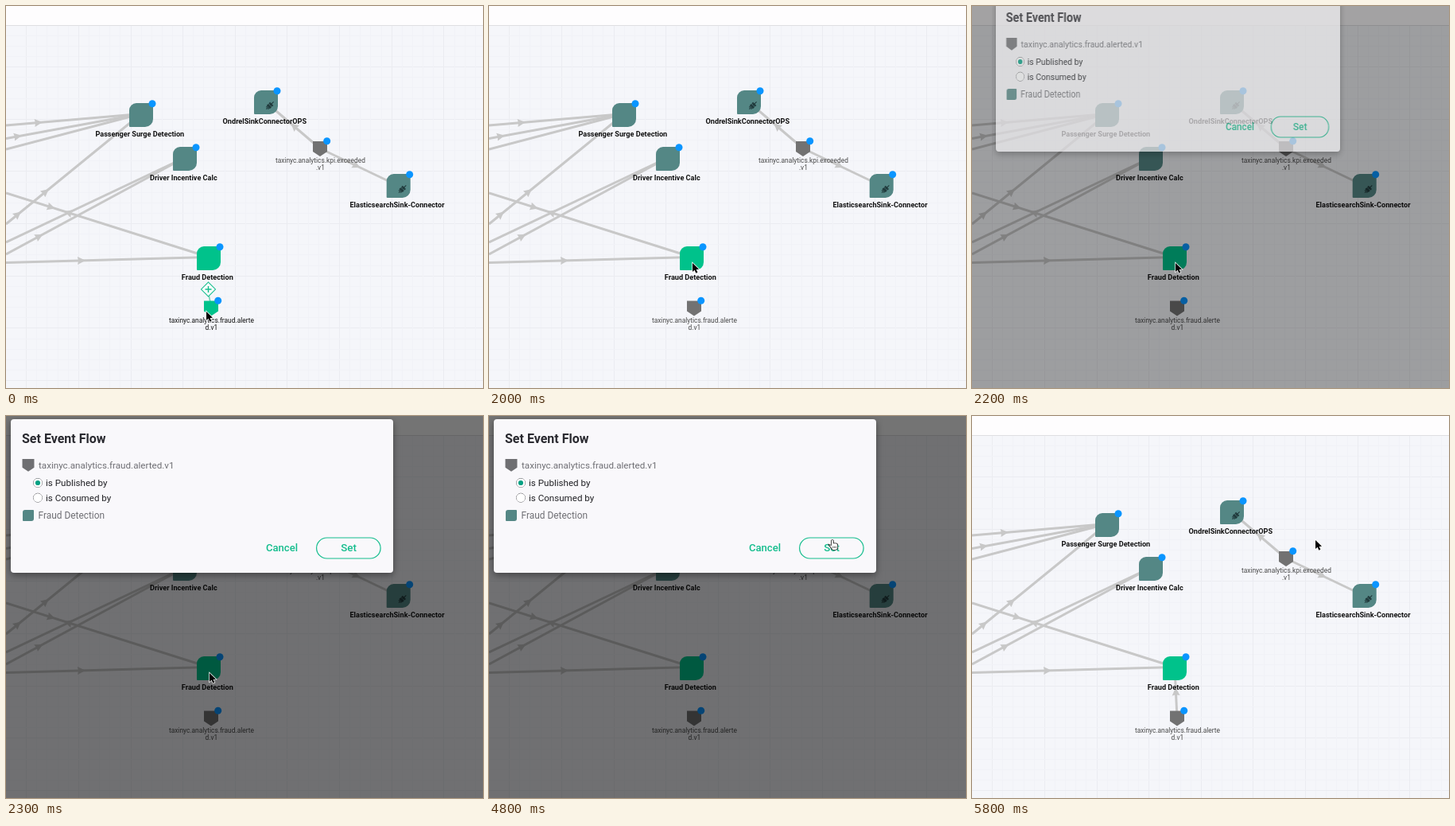
An HTML page with a canvas for the animation above (5.9 s loop, 600x480 px).

```html
<!DOCTYPE html>
<html lang="en">
<head>
<meta charset="utf-8">
<title>Event flow editor</title>
<style>
  html, body { margin: 0; width: 100%; height: 100%; overflow: hidden; background: #f5f6fa; }
  canvas { display: block; width: 600px; height: 480px; }
</style>
</head>
<body>
<canvas id="stage" width="600" height="480"></canvas>
<script>
const W = 600, H = 480, LOOP = 5900, STEP = 100;
const FONT = 'Roboto, Inter, sans-serif';
const GREEN = '#00c28b', MINT = '#14bd8d', TEAL = '#548785', BLUE = '#0a95ff';
const EDGE = '#c8c8c8', GREY = '#727272', INK = '#111';
const DRAG = 900, DROP = 2000, OPEN = 2020, CLOSE = 4897, FADE = 270, LINKED = 5300;

const stage = document.getElementById('stage').getContext('2d');
let ctx = stage;

const passenger = { x: 170, y: 137, label: 'Passenger Surge Detection' };
const driver = { x: 225, y: 192, label: 'Driver Incentive Calc' };
const sink = { x: 327, y: 121, label: 'OndrelSinkConnectorOPS', plug: true };
const search = { x: 493.7, y: 226, label: 'ElasticsearchSink-Connector', plug: true };
const fraud = { x: 255, y: 317, label: 'Fraud Detection', active: true };
const nodes = [passenger, driver, sink, search, fraud];
const kpi = { x: 395, y: 179, lines: ['taxinyc.analytics.kpi.exceeded', '.v1'] };
const alerted = { x: 258, y: 379.5, lines: ['taxinyc.analytics.fraud.alerte', 'd.v1'] };

// cursor moves: begin, end, x, y
const home = { x: 252, y: 384 };
const moves = [
  [300, 900, 254, 355], [900, 1200, 255, 327], [1800, 2000, 256, 323],
  [2600, 3700, 78, 94], [3800, 4700, 432, 156]
];

const clamp = v => Math.max(0, Math.min(1, v));
const mix = (a, b, p) => a + (b - a) * p;
const ease = p => (1 - Math.cos(Math.PI * p)) / 2;

function cursorAt(t) {
  let { x, y } = home;
  for (const [from, to, nx, ny] of moves) {
    const p = ease(clamp((t - from) / (to - from)));
    x = mix(x, nx, p);
    y = mix(y, ny, p);
  }
  return { x, y };
}

function text(str, x, y, size, color, weight = 400, align = 'left') {
  ctx.font = `${weight} ${size}px ${FONT}`;
  ctx.textAlign = align;
  ctx.fillStyle = color;
  ctx.fillText(str, x, y + size * 0.36);
}

function line(x1, y1, x2, y2, color, width) {
  ctx.strokeStyle = color;
  ctx.lineWidth = width;
  ctx.beginPath();
  ctx.moveTo(x1, y1);
  ctx.lineTo(x2, y2);
  ctx.stroke();
}

function poly(pts) {
  ctx.beginPath();
  for (const [x, y] of pts) ctx.lineTo(x, y);
  ctx.closePath();
}

function paint(fill, stroke, width) {
  if (stroke) {
    ctx.strokeStyle = stroke;
    ctx.lineWidth = width;
    ctx.stroke();
  }
  if (fill) {
    ctx.fillStyle = fill;
    ctx.fill();
  }
}

function round(x, y, w, h, r) {
  ctx.beginPath();
  ctx.roundRect(x, y, w, h, r);
}

function disc(x, y, r, fill, stroke) {
  ctx.beginPath();
  ctx.arc(x, y, r, 0, Math.PI * 2);
  paint(fill, stroke, 1);
}

function at(x, y, shape, angle = 0) {
  ctx.save();
  ctx.translate(x, y);
  ctx.rotate(angle);
  shape();
  ctx.restore();
}

function board() {
  ctx.fillStyle = '#f5f6fa';
  ctx.fillRect(0, 0, W, H);
  for (let i = 0; i < 46; i++) {
    const color = i % 5 ? '#f1f2f7' : '#ebecf1';
    const x = Math.round(25.2 + i * 13.13) + 0.5;
    const y = Math.round(10.5 + i * 13.13) + 0.5;
    line(x, 25, x, H, color, 1);
    line(0, y, W, y, color, 1);
  }
  ctx.fillStyle = '#fefdfe';
  ctx.fillRect(0, 0, W, 24);
  line(0, 24.5, W, 24.5, '#dfdfe2', 1);
}

// arrows: x positions along the edge; a negative one points backwards
function edge(from, to, ...arrows) {
  const dx = to.x - from.x, dy = to.y - from.y;
  line(from.x, from.y, to.x, to.y, EDGE, 3);
  for (const a of arrows) {
    const x = Math.abs(a), y = from.y + dy * (x - from.x) / dx;
    at(x, y, () => {
      poly([[5, 0], [-5, -5], [-4, 0], [-5, 5]]);
      paint(EDGE);
    }, Math.atan2(dy, dx) + (a < 0 ? Math.PI : 0));
  }
}

function edges() {
  const inlet = (y, node, ...arrows) => edge({ x: 0, y }, { x: node.x, y: node.y - 1.5 }, ...arrows);
  inlet(150, passenger, 41);
  inlet(166.5, passenger, 15);
  inlet(180, passenger);
  inlet(274, passenger, 15, 50);
  inlet(297, driver);
  inlet(312, driver, 42);
  inlet(322.5, fraud, 95);
  inlet(235, fraud, 57, -78);
  edge(kpi, sink, 362);
  edge(kpi, search, 441);
}

function plug() {
  const dark = '#213b3d';
  for (const x of [-1.6, 2]) line(x, -3, x, 3, dark, 2.3);
  for (const y of [-1.6, 1.6]) line(-5, y, 0.6, y, dark, 1.2);
  line(-6.5, 0, 6.5, 0, dark, 1.2);
}

function node({ x, y, label, plug: hasPlug, active }, target) {
  const pale = active ? '#cceae3' : '#c6dfe0';
  if (target && active) {
    round(x - 18, y - 20, 38, 39, [12, 2]);
    paint('#c9ebe2');
  }
  if (target) {
    round(x - 14.5, y - 15, 29.5, 30, [10, 2]);
    paint(pale, active ? '#0bbd8b' : '#07868a', 4);
    round(x - 12.5, y - 13, 25.5, 26, [8, 1]);
    paint(null, active ? '#0bbd8b' : '#07868a', 4);
  } else {
    round(x - 15, y - 15, 30, 30, [9, 4, 10, 1]);
    paint(active ? GREEN : TEAL);
    if (hasPlug) at(x + 5, y + 4, plug, -Math.PI / 4);
  }
  disc(x + 14, y - 14.2, 4.5, target ? (active ? pale : '#c6dce6') : BLUE);
  text(label, x - 1.7, y + 23.3, 9.15, INK, 700, 'center');
}

function shield(x, y, color, s = 1) {
  poly([[-9, -9], [9, -9], [9, 4], [0, 10], [-9, 4]].map(([u, v]) => [x + u * s, y + v * s]));
  paint(color);
}

function event({ x, y, lines }, selected) {
  shield(x, y, selected ? GREEN : GREY);
  disc(x + 8.7, y - 9.3, 4.5, BLUE);
  lines.forEach((s, i) =>
    text(s, x + 0.4, y + 15 + i * 9, 8.4, selected ? INK : '#4a4a4a', 400, 'center'));
}

function diamond(x, y, r) {
  poly([[x, y - r], [x + r, y], [x, y + r], [x - r, y]]);
  paint('#fbfdfd', MINT, 2);
  line(x - 4, y, x + 4, y, MINT, 1.5);
  line(x, y - 4, x, y + 4, MINT, 1.5);
}

function dialog() {
  ctx.save();
  ctx.shadowColor = 'rgba(0,0,0,.4)';
  ctx.shadowBlur = 9;
  ctx.shadowOffsetY = 3;
  round(6, 4, 481, 193, 4);
  paint('#f9f8fb');
  ctx.restore();

  text('Set Event Flow', 20, 28.5, 16, '#2a2a30', 700);
  shield(28, 61.5, '#6f6f72', 0.83);
  text('taxinyc.analytics.fraud.alerted.v1', 41, 62, 11.65, '#6f6f74');
  ['is Published by', 'is Consumed by'].forEach((s, i) => {
    const y = 84 + i * 18.7;
    disc(40, y, 5.5, '#fff', '#66666a');
    if (!i) disc(40, y, 3.1, '#00a083');
    text(s, 50, y, 11.6, '#222226');
  });
  round(21, 118, 14, 14, [3, 1]);
  paint(TEAL);
  text('Fraud Detection', 40.5, 125, 11.9, '#6f6f74');
  text('Cancel', 347, 165.5, 13.1, MINT, 500, 'center');
  round(390.6, 153, 80.5, 26, 13);
  paint(null, MINT, 1.2);
  text('Set', 431, 165.5, 13.4, MINT, 500, 'center');
}

// the dialog fades as one layer
const layer = document.createElement('canvas');
layer.width = W;
layer.height = H;
ctx = layer.getContext('2d');
dialog();
ctx = stage;

function overlay(p) {
  const s = mix(0.7, 1, p);
  ctx.fillStyle = `rgba(0,0,0,${0.54 * p})`;
  ctx.fillRect(0, 0, W, H);
  ctx.save();
  ctx.globalAlpha = p;
  ctx.drawImage(layer, 246.5 * (1 - s), -42 * (1 - p), W * s, H);
  ctx.restore();
}

function pointer() {
  poly([[0, 0], [0, 11], [2.5, 8.7], [4.4, 12.7], [6.4, 11.8], [4.6, 7.9], [8, 7.7]]);
  paint('#000', '#fff', 1.4);
}

function moveIcon() {
  const arm = [[1, -1], [3, -1], [3, -3], [6, 0], [3, 3], [3, 1], [1, 1]];
  const pts = [];
  for (let i = 0; i < 4; i++) {
    pts.push(...arm);
    arm.forEach(([u, v], k) => arm[k] = [-v, u]);
  }
  poly(pts);
  paint('#000', '#fff', 1.8);
}

function hand() {
  ctx.beginPath();
  ctx.roundRect(-1.2, 0, 2.2, 8, 1);
  ctx.roundRect(-1.2, 4.2, 7.4, 7.8, [1, 2, 3, 3]);
  ctx.moveTo(-1.2, 7);
  ctx.lineTo(-4, 6);
  ctx.lineTo(-0.6, 11);
  paint('#fff', '#222', 1.6);
  for (let i = 0; i < 3; i++) line(0.8 + i * 1.8, 7.6, 0.8 + i * 1.8, 10, '#333', 0.7);
}

function draw(t) {
  const selected = t < DROP;
  const dragging = selected && t >= DRAG;
  const p = clamp((t - OPEN) / FADE) * clamp(1 - (t - CLOSE) / FADE);
  const c = cursorAt(t);

  board();
  edges();
  if (t >= LINKED) edge(alerted, fraud, 256.4);
  nodes.forEach(n => node(n, dragging));
  event(kpi, false);
  if (dragging) {
    line(258, 372, c.x - 1, c.y + 1, MINT, 1.6);
    diamond(c.x - 3, c.y - 1, 6);
  } else if (selected) {
    line(255, 363, 257, 372, '#6fd3b4', 1.6);
    diamond(254.5, 356, 8.3);
  }
  event(alerted, selected);
  if (p > 0) overlay(p);

  const overRadio = c.x > 34 && c.x < 131 && c.y > 78 && c.y < 109;
  const overSet = c.x > 391 && c.x < 471 && c.y > 153;
  const clickable = p === 1 && (overRadio || overSet);
  at(c.x, c.y, dragging ? moveIcon : clickable ? hand : pointer);
}

const start = performance.now();
function tick() {
  const t = (performance.now() - start) % LOOP;
  draw(Math.floor(t / STEP) * STEP);
  requestAnimationFrame(tick);
}
tick();
</script>
</body>
</html>
```
